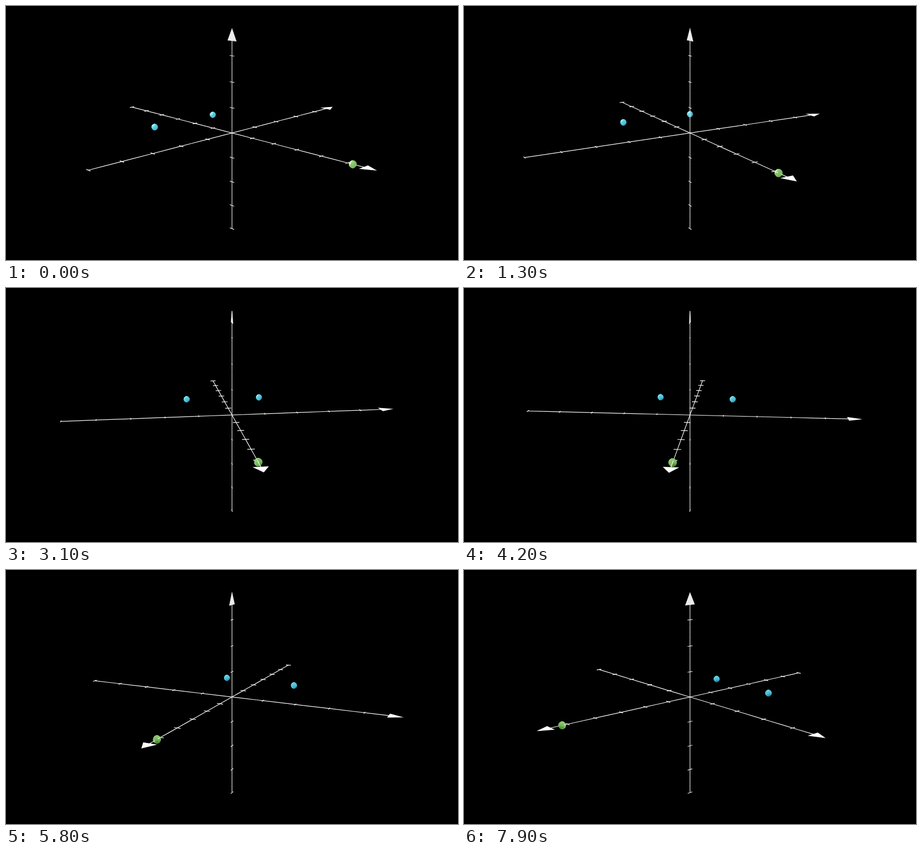
An HTML page with a canvas for the animation above (8000 ms loop, 854 by 480 pixels).

```html
<!DOCTYPE html>
<html lang="en">
<head>
<meta charset="utf-8">
<title>Rotating axes</title>
<style>
html, body { margin: 0; width: 100%; height: 100%; overflow: hidden; background: #000; }
canvas { display: block; }
</style>
</head>
<body>
<canvas id="stage" width="854" height="480"></canvas>
<script>
const ctx = document.getElementById("stage").getContext("2d");
const W = 854, H = 480, PX = 60, FOCAL = 20;
const PHI = 75 * Math.PI / 180, SIN_PHI = Math.sin(PHI), COS_PHI = Math.cos(PHI);
const LOOP = 8000, FRAME = 100, STEPS_PER_FRAME = 1.5, DEG_PER_STEP = 0.8;
const LIGHT = [-7, -9, 10];
const LINE = 1.2, TIP = 0.35, TICK = 0.1, PIECES = 20;

const add = (a, b, k = 1) => a.map((v, i) => v + b[i] * k);
const dot = (a, b) => a.reduce((sum, v, i) => sum + v * b[i], 0);
const unit = a => a.map(v => v / Math.hypot(...a));
const boxCenter = points => [0, 1, 2].map(i => {
  const values = points.map(p => p[i]);
  return (Math.min(...values) + Math.max(...values)) / 2;
});

// Every item is a polyline or filled polygon, painted back to front by its center.
const items = [];
function addItem(points, color, filled = false, width = LINE) {
  items.push({ points, color, filled, width, center: boxCenter(points) });
}

function addAxis(dir, side, half, max, color) {
  const at = (s, offset = 0) => add(dir.map(v => v * s), side, offset);
  const end = half - TIP, piece = (half + end) / PIECES;
  for (let i = 0; i < PIECES; i++) {
    addItem([at(-half + i * piece), at(-half + (i + 1) * piece)], color);
  }
  for (let n = -max; n < max; n++) {
    const s = n * half / max;
    if (n) addItem([at(s, -TICK), at(s, TICK)], color);
  }
  addItem([at(half), at(end, TIP / 2), at(end, -TIP / 2)], color, true);
}

// Flat facet colour: brighter toward the light, slightly darker away from it.
function shade(rgb, point, normal) {
  let k = 0.5 * dot(normal, unit(add(LIGHT, point, -1))) ** 3;
  if (k < 0) k *= 0.5;
  const channels = rgb.map(v => Math.round(Math.max(0, Math.min(255, v + 255 * k))));
  return `rgb(${channels})`;
}

function addBall(center, rgb, radius = 0.1, n = 8) {
  const normalAt = (i, j) => {
    const u = 2 * Math.PI * i / n, v = Math.PI * j / n;
    return [Math.cos(u) * Math.sin(v), Math.sin(u) * Math.sin(v), -Math.cos(v)];
  };
  const corners = [[0, 0], [1, 0], [1, 1], [0, 1]];
  for (let i = 0; i < n; i++) {
    for (let j = 0; j < n; j++) {
      const normal = normalAt(i + 0.5, j + 0.5);
      const points = corners.map(([a, b]) => add(center, normalAt(i + a, j + b), radius));
      addItem(points, shade(rgb, add(center, normal, radius), normal), true, 0.4);
    }
  }
}

addAxis([1, 0, 0], [0, 1, 0], 5.25, 6, "#fff");
addAxis([0, 1, 0], [1, 0, 0], 5.25, 5, "#fff");
addAxis([0, 0, 1], [1, 0, 0], 3.25, 4, "#ebebeb");
const BLUE = [88, 196, 221], GREEN = [131, 193, 103];
addBall([4.545, 0, 0], GREEN);
addBall([-2.31, -1.256, 0], BLUE);
addBall([-2.235, 1.278, 0], BLUE);

function draw(theta) {
  const s = Math.sin(theta), c = Math.cos(theta);
  const toward = ([x, y]) => x * c + y * s;
  const depth = p => toward(p) * SIN_PHI + p[2] * COS_PHI;
  const project = p => {
    const k = PX * FOCAL / (FOCAL - depth(p));
    return [
      W / 2 + (p[1] * c - p[0] * s) * k,
      H / 2 - (p[2] * SIN_PHI - toward(p) * COS_PHI) * k
    ];
  };

  ctx.fillStyle = "#000";
  ctx.fillRect(0, 0, W, H);
  ctx.miterLimit = 10;
  for (const item of items) item.depth = depth(item.center);
  items.sort((a, b) => a.depth - b.depth);
  for (const { points, color, filled, width } of items) {
    ctx.beginPath();
    for (const p of points) ctx.lineTo(...project(p));
    if (filled) {
      ctx.closePath();
      ctx.fillStyle = color;
      ctx.fill();
    }
    ctx.strokeStyle = color;
    ctx.lineWidth = width;
    ctx.stroke();
  }
}

const start = performance.now();
function tick() {
  const time = (performance.now() - start) % LOOP;
  const step = Math.floor(Math.floor(time / FRAME) * STEPS_PER_FRAME);
  draw((-45 + step * DEG_PER_STEP) * Math.PI / 180);
  requestAnimationFrame(tick);
}
tick();
</script>
</body>
</html>
```
